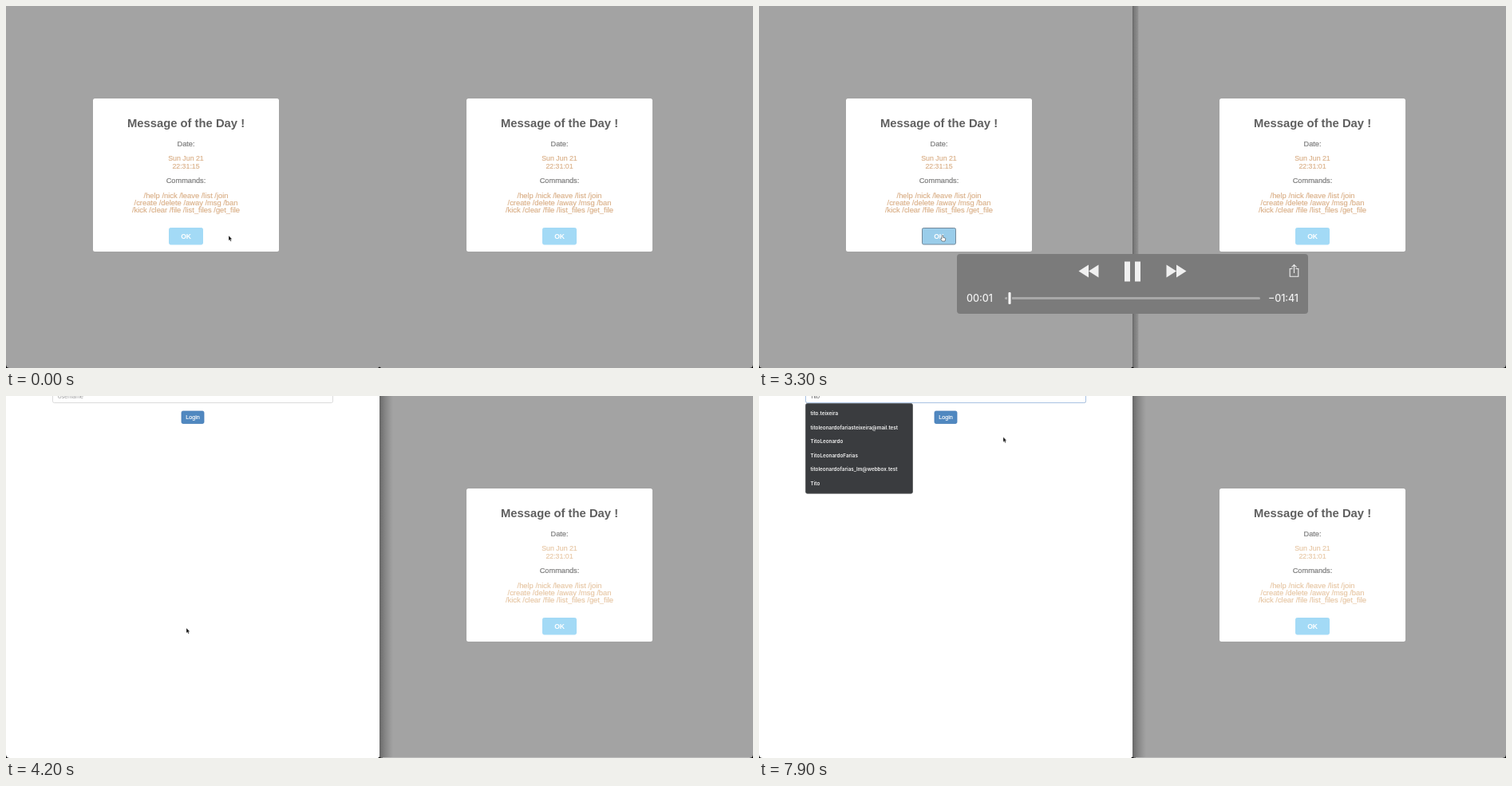
These frames come from a looping animation (936x454 px, 8000 ms). An HTML page:

```html
<!DOCTYPE html>
<html lang="en">
<head>
<meta charset="utf-8">
<title>Chat login</title>
<style>
html, body { margin: 0; width: 100%; height: 100%; overflow: hidden; background: #fff; }
svg { display: block; width: 936px; height: 454px; font-family: "Liberation Sans", Arial, sans-serif; }
.mid { text-anchor: middle; }
.title { font-size: 14.8px; font-weight: 700; fill: #606060; }
.label { font-size: 9.2px; fill: #7c7c7c; stroke: #7c7c7c; stroke-width: .2px; }
.code { font-size: 9.35px; fill: currentColor; stroke: currentColor; stroke-width: .15px; }
.date { font-size: 8.8px; fill: currentColor; stroke: currentColor; stroke-width: .15px; }
.ok { font-size: 8.6px; font-weight: 700; fill: #fff; }
.field { font-size: 7px; fill: #999; }
.typed { fill: #555; }
.list text { font: 600 6.35px Inter, sans-serif; fill: #f2f2f2; }
.clock { font: 500 12.4px Inter, sans-serif; fill: #f2f2f2; }

/* hard switches */
.step { animation: 8s step-end infinite; }
/* eased moves */
.move { animation: 8s ease-in-out infinite; }

#shade { animation-name: shade; animation-timing-function: linear; }
@keyframes shade { 0%, 50.25% { opacity: 1 } 52.25%, 100% { opacity: 0 } }
#leftBox { animation-name: close; transform-origin: 225.5px 212px; }
@keyframes close {
  0%, 50.25% { opacity: 1; transform: scale(1) }
  52%, 100% { opacity: 0; transform: scale(.5) }
}
#dimLogin { animation-name: dimLogin; }
@keyframes dimLogin { 0% { opacity: 0 } 49.75% { opacity: 1 } 52.25%, 100% { opacity: 0 } }
#leftOk { animation-name: leftOk; }
@keyframes leftOk {
  0% { fill: #a3daf6; stroke: #a3daf6 }
  30.5% { fill: #9acdea; stroke: #73889a }
  48.75%, 100% { fill: #9c9c9c; stroke: #9c9c9c }
}
#rightOk { animation-name: rightOk; }
@keyframes rightOk { 0% { stroke: #a3daf6 } 46% { stroke: #7f9fb2 } 52.25%, 100% { stroke: #a3daf6 } }
#rightText { animation-name: tone; }
@keyframes tone { 0% { color: #d9ae86 } 52.25%, 100% { color: #e6c5a2 } }

#seam { animation-name: seam; }
@keyframes seam { 0% { opacity: 0 } 27% { opacity: 1 } 45%, 100% { opacity: 0 } }
#shadow { animation-name: shadow; }
@keyframes shadow { 0% { opacity: 0 } 52.25%, 100% { opacity: 1 } }
#player { animation-name: player; }
@keyframes player { 0%, 26% { opacity: 0 } 29%, 43% { opacity: 1 } 46%, 100% { opacity: 0 } }

#hint { animation-name: hint; }
@keyframes hint { 0% { opacity: 1 } 83.5%, 100% { opacity: 0 } }
#caret { animation-name: caret; }
@keyframes caret { 0% { opacity: 0 } 73.5% { opacity: 1 } 79.75%, 100% { opacity: 0 } }
#focus, #menu { animation-name: menu; }
@keyframes menu { 0% { opacity: 0 } 74.75%, 100% { opacity: 1 } }
#upper { animation-name: upper; }
@keyframes upper { 0% { transform: translateY(52.65px) } 83.5%, 100% { transform: none } }
#lower { animation-name: lower; }
@keyframes lower { 0% { transform: translateY(-52.65px) } 83.5%, 100% { transform: none } }
#k1 { animation-name: k1; }
#k2 { animation-name: k2; }
#k3 { animation-name: k3; }
#k4 { animation-name: k4; }
@keyframes k1 { 0% { fill-opacity: 0 } 83.5%, 100% { fill-opacity: 1 } }
@keyframes k2 { 0% { fill-opacity: 0 } 87.25%, 100% { fill-opacity: 1 } }
@keyframes k3 { 0% { fill-opacity: 0 } 89.75%, 100% { fill-opacity: 1 } }
@keyframes k4 { 0% { fill-opacity: 0 } 91%, 100% { fill-opacity: 1 } }

#pointer { animation-name: travel; }
@keyframes travel {
  0%, 23.75% { transform: translate(279px, 288px) }
  31.25%, 45% { transform: translate(230px, 288px) }
  48.75%, 55% { transform: translate(226px, 291px) }
  63.75%, 65% { transform: translate(364px, 266px) }
  70%, 71.25% { transform: translate(209px, -3px) }
  73.5%, 92% { transform: translate(167px, -3px) }
  98.5%, 100% { transform: translate(306px, 51.5px) }
}
#arrow { animation-name: arrow; }
@keyframes arrow {
  0% { opacity: 1 } 28.5% { opacity: 0 } 52.25% { opacity: 1 }
  69% { opacity: 0 } 92.5%, 100% { opacity: 1 }
}
#hand { animation-name: hand; }
@keyframes hand { 0% { opacity: 0 } 28.5% { opacity: 1 } 52.25%, 100% { opacity: 0 } }
#beam { animation-name: beam; }
@keyframes beam { 0% { opacity: 0 } 69% { opacity: 1 } 83.5%, 100% { opacity: 0 } }
</style>
</head>
<body>
<svg viewBox="0 0 936 454">
  <defs>
    <linearGradient id="narrow">
      <stop offset="0" stop-color="#666"/>
      <stop offset=".3" stop-color="#7c7c7c"/>
      <stop offset=".8" stop-color="#8d8d8d"/>
      <stop offset="1" stop-color="#a3a3a3"/>
    </linearGradient>
    <linearGradient id="wide">
      <stop offset="0" stop-color="#686868"/>
      <stop offset=".35" stop-color="#828282"/>
      <stop offset=".75" stop-color="#989898"/>
      <stop offset="1" stop-color="#a3a3a3"/>
    </linearGradient>
    <g id="login">
      <rect x="220" y="19" width="28" height="15.5" rx="1.8" fill="#5088c0" stroke="#477db6" stroke-width=".8"/>
      <text class="mid" x="234" y="29.3" font-size="7.2" fill="#fff" stroke="#fff" stroke-width=".15">Login</text>
    </g>
    <g id="card">
      <rect x="-116.5" y="116" width="233" height="192" rx="2.5" fill="#fff"/>
      <g class="mid">
        <text class="title" y="151.7">Message of the Day !</text>
        <text class="label" y="176">Date:</text>
        <text class="date" y="194.4">Sun Jun 21</text>
        <text class="label" y="222">Commands:</text>
        <text class="code" y="240.9">/help /nick /leave /list /join</text>
        <text class="code" y="250.1">/create /delete /away /msg /ban</text>
        <text class="code" y="259.3">/kick /clear /file /list_files /get_file</text>
      </g>
    </g>
    <path id="rewind" d="M0 0L12.5-8V8ZM12.5 0L25-8V8Z" fill="#f0f0f0"/>
  </defs>

  <!-- login page -->
  <rect width="468" height="454" fill="#fff"/>
  <rect x="58.5" y="-9" width="351" height="17.5" rx="2" fill="#fff" stroke="#d2d2d2" stroke-width=".8"/>
  <rect id="focus" class="step" x="58.5" y="-9" width="351" height="17.5" rx="2" fill="none" stroke="#a8c2e2"/>
  <text id="hint" class="step field" x="64.7" y="3">Username</text>
  <text class="field typed" x="64.5" y="3"><tspan id="k1" class="step">T</tspan><tspan id="k2" class="step">i</tspan><tspan id="k3" class="step">t</tspan><tspan id="k4" class="step">o</tspan></text>
  <rect id="caret" class="step" x="64.5" y="-3" width=".8" height="7.5" fill="#333"/>
  <use href="#login"/>

  <g id="menu" class="step list">
    <rect x="58.5" y="9.5" width="134" height="112.7" rx="2" fill="#3a3c3f" stroke="#56585a" stroke-width=".8"/>
    <g id="upper" class="step">
      <text x="64.5" y="24.1">tito.teixeira</text>
      <text x="64.5" y="41.7">titoleonardofariasteixeira@mail.test</text>
      <text x="64.5" y="59.2">TitoLeonardo</text>
    </g>
    <g id="lower" class="step">
      <text x="64.5" y="76.8">TitoLeonardoFarias</text>
      <text x="64.5" y="94.3">titoleonardofarias_lm@webbox.test</text>
      <text x="64.5" y="111.9">Tito</text>
    </g>
  </g>

  <!-- overlays and dialogs -->
  <rect id="shade" class="move" width="468" height="454" fill="#a3a3a3"/>
  <g id="dimLogin" class="step"><use href="#login" style="filter:brightness(.78)"/></g>
  <rect x="468" width="468" height="454" fill="#a3a3a3"/>
  <rect id="seam" class="step" x="468" width="8" height="454" fill="url(#narrow)"/>
  <g id="shadow" class="step">
    <rect x="468" width="17" height="454" fill="url(#wide)"/>
    <path d="M472 453.6H932" stroke="#c4c4c4" stroke-width=".8"/>
  </g>

  <g id="leftBox" class="move" color="#d9ae86">
    <use href="#card" x="225.5"/>
    <text class="mid date" x="225.5" y="203.6">22:31:15</text>
    <rect id="leftOk" class="step" x="204.5" y="278.5" width="42" height="20.5" rx="1.8"/>
    <text class="mid ok" x="225.6" y="292">OK</text>
  </g>
  <g id="rightText" class="step">
    <use href="#card" x="693.5"/>
    <text class="mid date" x="693.5" y="203.6">22:31:01</text>
    <rect id="rightOk" class="step" x="672.5" y="278.5" width="42" height="20.5" rx="1.8" fill="#a3daf6"/>
    <text class="mid ok" x="693.6" y="292">OK</text>
  </g>

  <path d="M0 454V449.5Q0 454 4.5 454ZM936 454V449.5Q936 454 931.5 454ZM466 454L468 452.5L470 454Z"/>

  <g id="pointer" class="move">
    <path id="arrow" class="step" d="M0 0V6.2L1.4 5L2.4 7.2L3.4 6.7L2.5 4.6H4.4Z" fill="#111" stroke="#fff" stroke-width=".3"/>
    <path id="hand" class="step" d="M-1 0Q0-1 .8 0V2.4L3.4 3Q4 3.5 3.6 5L3 7H-.6L-2.4 4.2Q-2.4 3-1 4Z" fill="#fff" stroke="#444" stroke-width=".6"/>
    <path id="beam" class="step" d="M-1.5 3.4H1.5M0-4V3.4" fill="none" stroke="#333" stroke-width=".8"/>
  </g>

  <!-- player controls -->
  <g id="player" class="move">
    <rect x="248" y="311" width="440" height="75" rx="4" fill="#7b7b7b"/>
    <use href="#rewind" x="400.5" y="332.5"/>
    <use href="#rewind" transform="translate(535.5 332.5) scale(-1 1)"/>
    <path d="M458 320.5h7v25h-7zM471 320.5h7v25h-7z" fill="#f0f0f0"/>
    <path d="M668.5 329.5H665.2V339.3H675.8V329.5H672.5M670.5 335V324.8M667.5 327.6L670.5 324.6L673.5 327.6" fill="none" stroke="#eee" stroke-width="1.1"/>
    <rect x="308" y="365" width="320" height="3" rx="1.5" fill="#a8a8a8"/>
    <rect x="311" y="359" width="6" height="15" fill="#7b7b7b"/>
    <rect x="312.5" y="359" width="3" height="15" rx="1" fill="#fff"/>
    <text class="clock" x="260" y="371">00:01</text>
    <text class="clock" x="676" y="371" text-anchor="end">−01:41</text>
  </g>
</svg>
</body>
</html>
```
